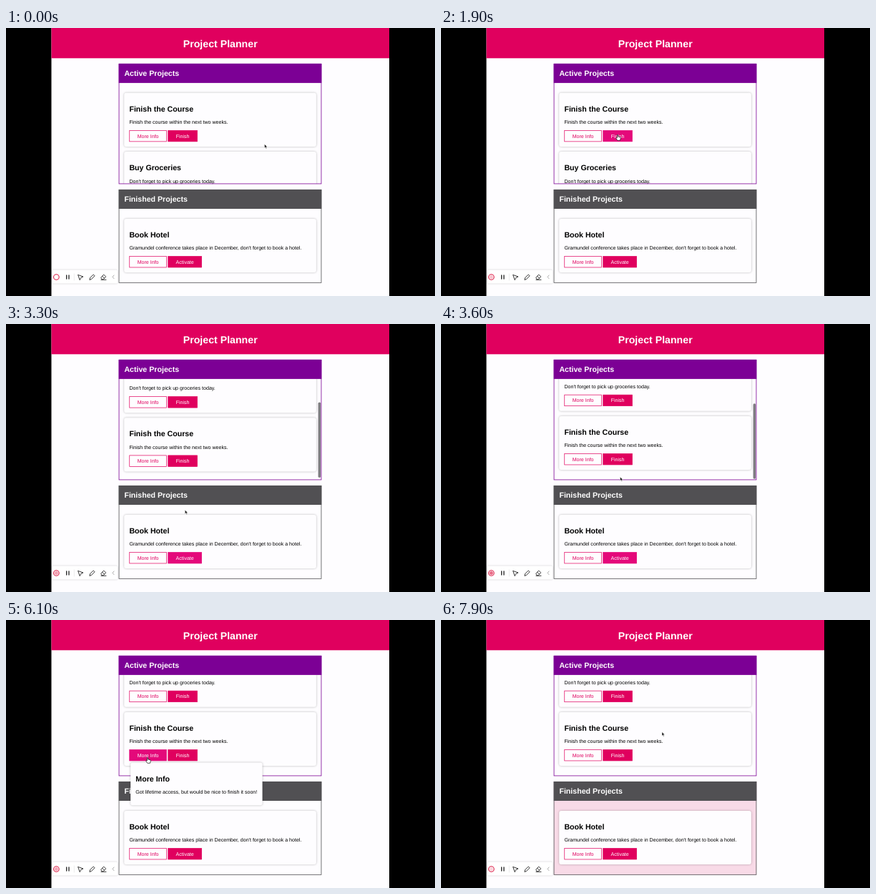
These frames come from a looping animation (600 px wide and 375 px high, 8 s). An HTML page:

```html
<!DOCTYPE html>
<html lang="en">
<head>
<meta charset="utf-8">
<title>Project Planner</title>
<style>
  html, body { margin: 0; width: 100%; height: 100%; overflow: hidden; background: #000; }
  #stage { display: block; width: 600px; height: 375px; }
  text { font-family: "Liberation Sans", Arial, sans-serif; text-rendering: geometricPrecision; }
  .h1 { font-size: 14.18px; font-weight: 700; }
  .h2 { font-size: 10.63px; font-weight: 700; }
  .p { font-size: 7.09px; }
  .card { fill: #fefdff; filter: drop-shadow(0 .9px 1.8px rgba(0, 0, 0, .28)); }
</style>
</head>
<body>
<svg id="stage" viewBox="0 0 600 375" xmlns="http://www.w3.org/2000/svg"></svg>
<script>
const LOOP = 8000, STEP = 100;
const PAGE = '#fefdff', PINK = '#e0005e', HOVER = '#e4097a', PURPLE = '#7c0095', GREY = '#515053', DROP = '#f8dae7';
const LEFT = 157.7, WIDTH = 283.6, HEAD = 27, PITCH = 82.3, MAX_SCROLL = 44.2;
const stage = document.getElementById('stage');

const projects = {
  course: ['Finish the Course', 'Finish the course within the next two weeks.'],
  food: ['Buy Groceries', "Don't forget to pick up groceries today."],
  hotel: ['Book Hotel', "Gramundel conference takes place in December, don't forget to book a hotel."]
};

// time, x, y, pointer shape
const path = [
  [0, 361.5, 162.5, 'arrow'], [1200, 361.5, 162.5, 'arrow'],
  [1700, 247, 149, 'hand'], [2050, 247, 149, 'hand'],
  [2400, 249.7, 289.3, 'beam'], [2500, 249.7, 289.3, 'beam'],
  [2800, 250, 325, 'hand'], [3050, 250, 325, 'hand'],
  [3500, 250.5, 214, 'arrow'], [3700, 250.5, 214, 'arrow'],
  [4000, 232, 17, 'arrow'], [4100, 232, 17, 'arrow'],
  [4400, 201.7, 105.3, 'hand'], [4800, 201.7, 105.3, 'hand'],
  [5300, 235, 148, 'arrow'], [5600, 235, 148, 'arrow'],
  [5900, 198, 192, 'hand'], [6200, 198, 192, 'hand'],
  [6500, 238, 234, 'arrow'], [6800, 238, 234, 'arrow'],
  [7500, 309, 156.7, 'arrow'], [LOOP, 309, 156.7, 'arrow']
];
const pulse = [[0, 0], [1000, .95], [1700, .2], [2400, .6], [3000, .2], [3600, .65],
  [4600, .95], [5400, .2], [6100, .4], [6700, .9], [7900, .2], [LOOP, 0]];
const activeScroll = [[0, 0], [250, 0], [500, 1], [600, 1], [900, 0], [3000, 0], [3350, 1], [LOOP, 1]];
const doneScroll = [[0, 0], [2000, 0], [2350, 1], [LOOP, 1]];
const activeThumb = [[0, 0], [100, 0], [200, 1], [1300, 1], [1600, 0], [3000, 0], [3100, 1], [4000, 1], [4300, 0], [LOOP, 0]];
const doneThumb = [[0, 0], [2000, 0], [2100, 1], [LOOP, 1]];

const within = (t, a, b) => t >= a && t < b;

function span(keys, t) {
  let i = 0;
  while (i < keys.length - 2 && t >= keys[i + 1][0]) i++;
  const a = keys[i], b = keys[i + 1];
  const u = (t - a[0]) / (b[0] - a[0]);
  return { a, b, u: u * u * (3 - 2 * u) };
}

function at(keys, t, col = 1) {
  const { a, b, u } = span(keys, t);
  return a[col] + (b[col] - a[col]) * u;
}

const rect = (x, y, w, h, fill, more = '') =>
  `<rect x="${x}" y="${y}" width="${w}" height="${h}" fill="${fill}" ${more}/>`;
const text = (x, y, cls, str, fill = '#000', anchor = 'start') =>
  `<text x="${x}" y="${y}" class="${cls}" fill="${fill}" text-anchor="${anchor}">${str}</text>`;
const box = (x, y, w, h) =>
  `<rect class="card" x="${x}" y="${y}" width="${w}" height="${h}" rx="3"/>`;

function button(x, y, w, label, solid, hover) {
  const fill = hover ? HOVER : solid ? PINK : PAGE;
  return rect(x + .35, y + .35, w - .7, 15.5, fill, `stroke="${hover ? HOVER : PINK}" stroke-width=".7"`) +
    text(x + w / 2, y + 10.5, 'p', label, solid || hover ? '#fff' : PINK, 'middle');
}

function card(id, y, action, hot) {
  const [title, note] = projects[id];
  return box(165.2, y, 268.7, 75.2) +
    text(172.4, y + 25.9, 'h2', title) +
    text(172.4, y + 43.4, 'p', note) +
    button(172.4, y + 52.2, 52.4, 'More Info', false, hot === 'info') +
    button(226.4, y + 52.2, action === 'Finish' ? 41.4 : 47.6, action, true, hot === 'action');
}

function list(o) {
  const view = o.y + HEAD, h = o.ids.length > 1 ? 141.4 : 103.7;
  const shift = o.ids.length > 1 ? o.scroll * MAX_SCROLL : 0;
  let out = rect(LEFT, o.y, WIDTH, HEAD + h, o.bg || PAGE);
  out += `<svg x="${LEFT}" y="${view}" width="${WIDTH}" height="${h}" viewBox="${LEFT} ${view} ${WIDTH} ${h}">`;
  o.ids.forEach((id, i) => {
    out += card(id, o.y + 40.9 + i * PITCH - shift, o.action, o.hot && o.hot[0] === i ? o.hot[1] : '');
  });
  out += '</svg>';
  if (o.ids.length > 1 && o.thumb > 0)
    out += rect(436.6, view + 1.4 + shift * .745, 3.6, 105.6, '#7f7d82', `rx="1.8" opacity="${o.thumb}"`);
  out += rect(LEFT + .35, o.y + .35, WIDTH - .7, HEAD + h - .7, 'none', `stroke="${o.color}" stroke-width=".8"`);
  return out + rect(LEFT, o.y, WIDTH, HEAD, o.color) + text(165.4, o.y + 16.9, 'h2', o.title, '#fff');
}

const tip = (y, w, note) =>
  box(174.2, y, w, 59.8) + text(181.3, y + 26, 'h2', 'More Info') + text(181.3, y + 43.4, 'p', note);

function toolbar(t) {
  const red = '#dd1f48';
  return rect(64, 338.5, 92, 19, '#fff', 'rx="1.5" style="filter:drop-shadow(0 0 .8px rgba(0,0,0,.2))"') +
    `<circle cx="70.4" cy="348.5" r="3.8" fill="#fff" stroke="${red}" stroke-width="1.1"/>` +
    `<circle cx="70.4" cy="348.5" r="2.5" fill="${red}" opacity="${at(pulse, t)}"/>` +
    '<g fill="none" stroke="#222" stroke-width=".9" stroke-linejoin="round" stroke-linecap="round">' +
    '<path d="M84.7 346v5M88 346v5" stroke-width="1.3"/>' +
    '<path d="M95.3 344v9" stroke="#ddd" stroke-width=".6"/>' +
    '<path d="M101 345.5l7 2.5-3.1 1.3-1.5 3z"/>' +
    '<path d="M117 352l.7-2.6 4.6-4.4 1.8 1.8-4.6 4.5z"/>' +
    '<path d="M133 349l3.7-3.9 3 2.8-3.8 4h-1.3zM134.6 347.3l3.1 2.9M133 352.3h7"/>' +
    '<path d="M151 346l-2 2.3 2 2.3" stroke="#888" stroke-width=".7"/></g>';
}

const shapes = {
  arrow: '<path d="M0 0V5.4L1.3 4.2 2.2 6.2 3.1 5.8 2.3 3.9H4Z" fill="#111" stroke="#fff" stroke-width=".5"/>',
  hand: '<path d="M-.7.6Q0-.5.7.6V3L4 3.8Q4.5 4.2 4.2 5.6L3.5 8.3H-.2L-2.4 5.2Q-2.3 4.2-.7 5Z" fill="#fff" stroke="#111" stroke-width=".7" stroke-linejoin="round"/>',
  beam: '<path d="M-1.3-3.2Q0-3.2 0-2.4Q0-3.2 1.3-3.2M0-2.6V2.6M-1.3 3.2Q0 3.2 0 2.4Q0 3.2 1.3 3.2" fill="none" stroke="#222" stroke-width=".8"/>'
};

function pointer(t) {
  const { a, b, u } = span(path, t);
  const shape = a[3] === b[3] || u < .1 ? a[3] : u > .85 ? b[3] : 'arrow';
  return `<g transform="translate(${at(path, t, 1)} ${at(path, t, 2)})">${shapes[shape]}</g>`;
}

function render(t) {
  const moved = within(t, 2000, 3000);
  const active = t < 2000 ? ['course', 'food'] : moved ? ['food'] : ['food', 'course'];
  const done = moved ? ['hotel', 'course'] : ['hotel'];
  const hotActive = within(t, 1600, 2500) ? [0, 'action']
    : within(t, 4400, 5000) ? [0, 'info']
    : within(t, 5900, 6400) ? [1, 'info'] : null;
  const hotDone = within(t, 2700, 3000) ? [1, 'action'] : within(t, 3000, 3700) ? [0, 'action'] : null;

  let out = rect(0, 0, 600, 375, '#000') + rect(63.5, 0, 472.5, 375, PAGE) +
    rect(63.5, 0, 472.5, 42.3, PINK) + text(299.7, 26.5, 'h1', 'Project Planner', '#fff', 'middle');
  out += list({ y: 49.9, ids: active, title: 'Active Projects', color: PURPLE, action: 'Finish',
    hot: hotActive, scroll: at(activeScroll, t), thumb: at(activeThumb, t) });
  out += list({ y: moved ? 188.3 : 226, ids: done, title: 'Finished Projects', color: GREY, action: 'Activate',
    hot: hotDone, scroll: at(doneScroll, t), thumb: at(doneThumb, t), bg: t >= 7800 ? DROP : PAGE });
  if (within(t, 4500, 5600)) out += tip(117.2, 154.8, 'Not really a business topic but still important.');
  if (within(t, 6000, 6800)) out += tip(199.5, 184.4, 'Got lifetime access, but would be nice to finish it soon!');
  stage.innerHTML = out + toolbar(t) + pointer(t);
}

const start = performance.now();
let last = -1;
function tick() {
  const t = Math.floor(((performance.now() - start) % LOOP) / STEP) * STEP;
  if (t !== last) render(last = t);
  requestAnimationFrame(tick);
}
tick();
</script>
</body>
</html>
```
